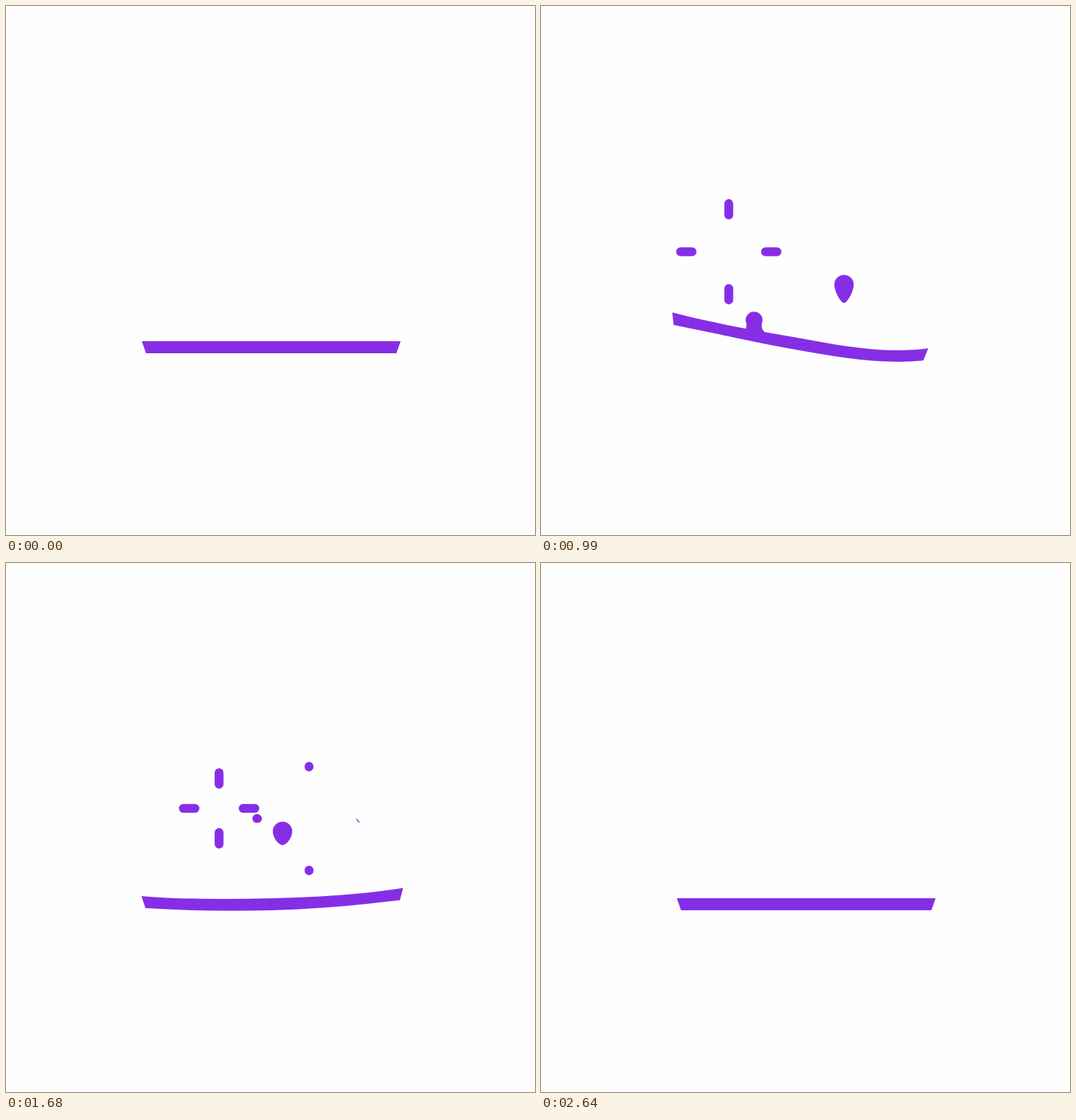
These frames come from a looping animation (748x748 px, 2.7 s). An HTML page:

```html
<!DOCTYPE html>
<html lang="en">
<head>
<meta charset="utf-8">
<title>Bubbling liquid</title>
<style>
html, body { margin: 0; width: 100%; height: 100%; overflow: hidden; background: #fefefe; }
svg { display: block; width: 100%; height: 100%; }
</style>
</head>
<body>
<svg viewBox="0 0 748 748" fill="#862ee6" stroke="none">
  <path id="band"/>
  <path id="drops"/>
  <path id="rays" fill="none" stroke="#862ee6" stroke-width="12.5" stroke-linecap="round"/>
</svg>
<script>
const LOOP = 2700, STEP = 30, LAST = 2640;
const LEVEL = 474, CENTER = 375, THICK = 17, R = 13.7;
const DETACH = 200, BURST = 650, RISE = 660, FADE = 1030, END = 1070;
const [band, drops, rays] = ['band', 'drops', 'rays'].map(id => document.getElementById(id));

// Swings of the surface: time, left x y slope, middle y, right x y slope
const REST = [192, LEVEL, 0, LEVEL, 558, LEVEL, 0];
const swings = [
  [0, ...REST],
  [360, 136, 386, .05, 432.5, 495.5, 499, .07],
  [750, 222, 497.5, -.09, 461.5, 584, 388, -1],
  [1080, 178, 420, .34, 470, 540, 504, .04],
  [1260, 192, 476, .1, 473.8, 561.5, 456, -.19],
  [1680, 191.5, 471, .08, 474, 561.5, 459.5, -.16],
  [1920, 186, 433, .33, 471.5, 553.5, 487.5, .01],
  [LAST, ...REST]
];

const bubbles = [
  { x: 265.5, start: 110, home: 347.5, depth: 80 },
  { x: 428.5, start: 650, home: 361.3, depth: 97 },
  { x: 301.3, start: 900, home: 347, depth: 121 },
  { x: 391, start: 1200, home: 363.5, depth: 112 }
];

const xy = (...v) => v.map(n => n.toFixed(2)).join(' ');
const smooth = u => u * u * (3 - 2 * u);

// Left, middle and right point of the surface, each with its slope
function surfaceAt(t) {
  const i = Math.max(1, swings.findIndex(s => s[0] >= t));
  const a = swings[i - 1], b = swings[i];
  const k = (1 - Math.cos(Math.PI * (t - a[0]) / (b[0] - a[0]))) / 2;
  const [, xl, yl, sl, ym, xr, yr, sr] = a.map((v, j) => v + (b[j] - v) * k);
  const xm = CENTER + 1.85 * ((xl + xr) / 2 - CENTER);
  const h = xm - xl, g = xr - xm;
  // slope that keeps the curvature continuous
  const sm = (3 * ((ym - yl) / h ** 2 + (yr - ym) / g ** 2) - sl / h - sr / g) / (2 / h + 2 / g);
  return [{ x: xl, y: yl, s: sl }, { x: xm, y: ym, s: sm }, { x: xr, y: yr, s: sr }];
}

function curve(a, b) {
  const d = (b.x - a.x) / 3;
  return 'C' + xy(a.x + d, a.y + a.s * d, b.x - d, b.y - b.s * d, b.x, b.y);
}

function heightAt([l, m, r], x) {
  const [a, b] = x < m.x ? [l, m] : [m, r];
  const w = b.x - a.x, u = (x - a.x) / w, v = 1 - u;
  return a.y + (b.y - a.y) * smooth(u) + w * u * v * (v * a.s - u * b.s);
}

function bandPath([l, m, r]) {
  const below = (p, dx, ease) => ({ x: p.x + dx, y: p.y + THICK * Math.hypot(1, p.s), s: p.s * ease });
  const slant = p => 6 + (p.y - LEVEL) * .1;
  const bl = below(l, slant(l), .75), bm = below(m, 0, 1), br = below(r, -slant(r), .75);
  return 'M' + xy(l.x, l.y) + curve(l, m) + curve(m, r)
    + 'L' + xy(br.x, br.y) + curve(br, bm) + curve(bm, bl) + 'Z';
}

function circle(x, y, r) {
  const arc = `A${xy(r, r)} 0 0 1 `;
  return 'M' + xy(x - r, y) + arc + xy(x + r, y) + arc + xy(x - r, y) + 'Z';
}

// Head still joined to the liquid by a narrowing stem
function stem(x, y, age, level) {
  const r = R * Math.min(1, (age / 100) ** 1.3), phase = Math.PI * age / 210;
  const waist = 10.5 * Math.sin(phase), foot = 16 * Math.sqrt(Math.cos(phase / 2));
  const base = level + Math.min(5, age / 5 - 14.5);
  if (base <= y) return '';
  const neck = y + r * .4, bend = y + r * 1.08, edge = base - 1.5;
  return circle(x, y, r) + 'M' + xy(x + r * .9, neck) + 'Q' + xy(x + waist, bend, x + foot, edge)
    + 'L' + xy(x + foot, base) + 'L' + xy(x - foot, base) + 'L' + xy(x - foot, edge)
    + 'Q' + xy(x - waist, bend, x - r * .9, neck) + 'Z';
}

function tear(x, y, age) {
  const extra = 32 * (1 - age / BURST) ** 1.3, len = R + extra;
  const side = R * .55 + extra * .2, tip = Math.max(2.5, 7.5 - extra * .27);
  return 'M' + xy(x - R, y) + `A${xy(R, R)} 0 0 1 ` + xy(x + R, y)
    + 'C' + xy(x + R, y + side, x + tip, y + len, x, y + len)
    + 'C' + xy(x - tip, y + len, x - R, y + side, x - R, y) + 'Z';
}

function crescent(x, y) {
  return 'M' + xy(x - 6, y - 1) + 'A6.2 6.2 0 0 0 ' + xy(x, y + 6) + 'A14 14 0 0 1 ' + xy(x - 6, y - 1) + 'Z';
}

// Four rays whose outer ends leave first; the right one fades early
function burst(x, y, age) {
  const v = (age - BURST) / (END - BURST);
  const a = 22.2 + 52 * smooth(v);
  const b = Math.max(a + .01, 9.8 + 64.5 * (1 - Math.exp(-((v / .31) ** 1.5))));
  const fading = age >= FADE;
  const dirs = [[0, -1], [-1, 0], [0, 1], [1, 0]].slice(0, fading ? 3 : 4);
  return {
    lines: dirs.map(([i, j]) => 'M' + xy(x + i * a, y + j * a) + 'L' + xy(x + i * b, y + j * b)).join(''),
    solid: fading ? crescent(x + a, y) : ''
  };
}

function draw(t) {
  const top = surfaceAt(t);
  let solid = '', lines = '';
  for (const { x, start, home, depth } of bubbles) {
    const age = t - start;
    if (age <= 0 || age >= END) continue;
    const y = home + depth * Math.max(0, 1 - age / RISE) ** 1.5;
    if (age < DETACH) solid += stem(x, y, age, heightAt(top, x));
    else if (age < BURST) solid += tear(x, y, age);
    else {
      const parts = burst(x, y, age);
      solid += parts.solid;
      lines += parts.lines;
    }
  }
  band.setAttribute('d', bandPath(top));
  drops.setAttribute('d', solid);
  rays.setAttribute('d', lines);
}

const begin = performance.now();
function tick() {
  const t = (performance.now() - begin) % LOOP;
  draw(Math.min(LAST, Math.floor(t / STEP) * STEP));
  requestAnimationFrame(tick);
}
tick();
</script>
</body>
</html>
```
